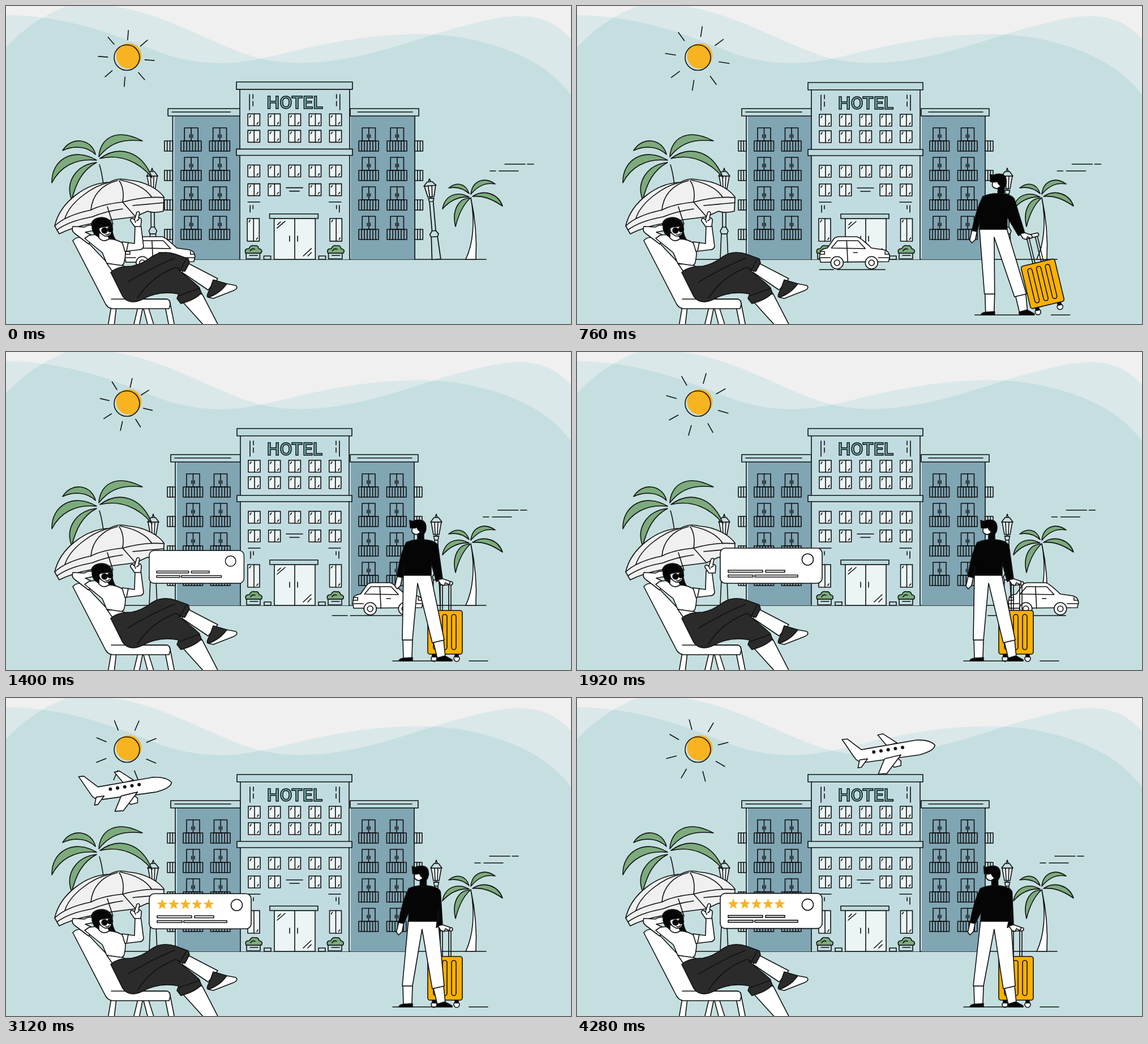
Animation of 998 by 561 pixels, one loop 4.32 s. Source, as an HTML page:

```html
<!DOCTYPE html>
<html lang="en">
<head>
<meta charset="utf-8">
<title>Hotel holiday</title>
<style>
html, body { margin: 0; width: 100%; height: 100%; overflow: hidden; background: #c5dfe0; }
svg { display: block; width: 100vw; height: 100vh; }
path, rect, circle { stroke: #111; stroke-width: 1.6; stroke-linejoin: round; stroke-linecap: round; }
.flat, .flat path { stroke: none; }
text { font: 500 32px Roboto, "Open Sans", sans-serif; text-anchor: middle; fill: #72b5b5; stroke: #111; stroke-width: 1.5; }
</style>
</head>
<body>
<svg id="stage" viewBox="0 0 998 561"></svg>
<script>
const SKY = '#c5dfe0', MIST = '#dae8e9', WALL = '#80a5b3', FRONT = '#c1dce0', TRIM = '#bcdadd',
  GLASS = '#ecf5f5', GREEN = '#7cab7c', GOLD = '#f8b320', DARK = '#2b2b2b', INK = '#050505', CLOTH = '#f0f0f1';
const LOOP = 4320;

const path = (d, fill = 'none', more = '') => `<path d="${d}" fill="${fill}" ${more}/>`;
const rect = (x, y, w, h, fill = 'none', more = '') =>
  `<rect x="${x}" y="${y}" width="${w}" height="${h}" fill="${fill}" ${more}/>`;
const disc = (x, y, r, fill = 'none', more = '') => `<circle cx="${x}" cy="${y}" r="${r}" fill="${fill}" ${more}/>`;
const group = (id, body) => `<g id="${id}">${body}</g>`;
const each = (list, draw) => list.map(draw).join('');
const range = n => [...Array(n).keys()];
const FLAT = 'class="flat"';

// Sky
const waveA = 'M0 73Q45 24 107 0H185C285 12 372 74 455 94C590 122 730 52 810 35C900 9 955 10 998 58V561H0Z';
const waveB = 'M0 16C130 18 215 62 290 88C400 119 465 86 560 68C690 42 790 44 870 72C932 93 968 118 998 157V561H0Z';
const sky = rect(0, 0, 998, 561, CLOTH, FLAT) +
  `<clipPath id="over"><path d="${waveA}"/></clipPath>` +
  path(waveA, MIST, FLAT) + path(waveB, MIST, FLAT) + path(waveB, SKY, FLAT + ' clip-path="url(#over)"');
const sun = disc(217, 88, 22.5, GOLD, FLAT) + disc(213.5, 91, 22.5) + '<path id="rays" fill="none"/>';
const breeze = path('M881 279H917M921 279H932M855 291H865M871 291H905');

// Hotel
const win = (x, y, h = 21) => rect(x - 1, y + 2, 21, h - 1, GLASS, FLAT) + rect(x, y, 21, h) +
  path(`M${x + 11} ${y}v${h}M${x + 3} ${y + 6}l2 -3M${x + 16} ${y + h - 3}l2 -3`);
const rails = (x, y, w, n) => rect(x, y, w, 18) +
  path(each(range(n), i => `M${x + w * (i + 1) / (n + 1)} ${y}v18`));
const balcony = (x, y) => rect(x + 6, y, 23, 23) +
  path(`M${x + 17.5} ${y}v23M${x + 15} ${y + 12}v5M${x + 20} ${y + 12}v5`) + rails(x, y + 23, 34.5, 6);
const floors = [215, 267, 319, 371];
const wing = (fillX, x, roofX, roofW, lineX, cols, sideX) =>
  rect(fillX, 194, 112, 253, WALL, FLAT) + path(`M${x} 194V447`) +
  rect(roofX, 181, roofW, 13, TRIM) + path(`M${lineX} 187h${roofW - 24}`) +
  each(floors, y => each(cols, c => balcony(c, y)) + rails(sideX, y + 23, 14, 2));
const bush = x => rect(x + 1, 436, 24, 10, FRONT) + path(`M${x + 7} 440h14`) +
  path(`M${x} 436Q${x - 3} 428 ${x + 6} 428Q${x + 9} 421 ${x + 16} 423Q${x + 22} 422 ${x + 23} 428Q${x + 31} 430 ${x + 27} 436Z`, GREEN) +
  path(`M${x + 8} 432q3 -5 8 -3`);
const cols = range(5).map(i => 428 + 35.7 * i);
const front = rect(414, 147, 192, 300, FRONT, FLAT) + path('M414 147V447M606 147V447') +
  rect(408, 135, 203, 13, TRIM) + rect(408, 253, 203, 11, TRIM) +
  '<text x="510" y="181.5">HOTEL</text>' +
  path('M431 157V184M437 157V164M437 169V177M589 157V184M583 157V164M583 169V177') +
  each([191, 220, 281], y => each(cols, x => win(x, y))) +
  each(cols, (x, i) => i == 2 ? '' : win(x, 314)) +
  path('M495 321H524M501 327H518M428 346H449M570 346H591M432 352V364M437 352V358M588 352V364M583 352V358') +
  win(427, 375, 40) + win(571.5, 375, 40) +
  rect(474, 375, 72, 72, GLASS) + path('M510 375V447M501 406V415M515 406V415M479 392L493 380M480 386L485 381M525 441L539 428M533 441L539 435') +
  rect(466, 367, 85, 8, TRIM) + rect(456, 441, 12, 6, FRONT) + rect(552, 441, 12, 6, FRONT) +
  bush(424) + bush(568);
const hotel = group('left', wing(302, 299, 291, 123, 298, [313, 361.5], 285)) +
  group('right', wing(609, 721, 608, 120, 621, [623, 672.5], 721)) + group('front', front);

// Street
const lamp = x => `<g transform="translate(${x} 0)">` +
  path('M-7 447L-5 402H5L7 447Z', SKY) + path('M-5 402L-7 397L-3 390H3L7 397L5 402Z', SKY) +
  path('M-3 390V331M3 390V331') + disc(0, 328, 4, SKY) +
  path('M-9 300H9L5 322H-5Z', GLASS) + path('M-10 300L-4 292H4L10 300ZM-2 292L0 286L2 292M-3 300L-2 322M3 300L2 322M-5 325H5', SKY) + '</g>';
const palmLeft = path('M165 280Q170 295 174 330') + each([
  'M164 266C166 233 195 214 241 238C205 234 183 242 164 266Z',
  'M166 269C200 244 240 256 258 303C236 276 203 260 166 269Z',
  'M158 262C152 235 116 228 100 255C120 245 144 248 158 262Z',
  'M160 272C120 248 80 270 81 312C94 286 120 268 160 272Z',
  'M160 276C124 280 104 310 116 342C124 312 134 290 160 276Z'], d => path(d, GREEN));
const palmRight = path('M821 338C829 380 825 420 812 447H830C832 410 828 370 821 338Z', '#fff') + each([
  'M821 332C824 307 846 301 864 314C846 311 833 318 821 332Z',
  'M824 336C845 322 870 332 877 353C858 340 842 334 824 336Z',
  'M818 331C812 312 795 310 782 321C797 318 808 322 818 331Z',
  'M818 337C795 325 775 335 771 358C784 343 800 336 818 337Z',
  'M820 339C800 338 787 360 794 389C800 365 808 350 820 339Z'], d => path(d, GREEN));
const wheel = x => disc(x, 453, 11, '#fff') + disc(x, 453, 5);
const car = '<path id="dash" fill="none"/>' +
  path('M430 452L428 443L430 432Q434 428 442 427L454 410Q457 407 464 407H494Q500 408 520 427L541 430Q552 432 552 443L550 451Z', '#fff') +
  path('M449 427L460 414H496L509 428ZM428 444H447M532 444H551M430 433H437V438H429M544 433V438H551M488 435H495M476 414L478 452') +
  wheel(459) + wheel(520);

// Holidaymaker under the umbrella
const umbrella =
  path('M86 388C96 345 142 312 183 311Q198 302 216 307C246 309 270 324 279 337L278 362Q262 366 250 362L228 372L188 377L150 384Q118 390 94 402Z', CLOTH) +
  path('M86 388Q106 369 150 360Q168 350 206 346Q246 335 279 338M90 395Q112 379 152 372Q176 362 206 358M197 308C168 315 152 335 150 360M200 308C208 320 208 334 206 346M202 307C236 314 250 326 257 337M183 311C150 318 112 348 104 375M206 346L228 371M224 352L279 347') +
  path('M179 354L189 385', 'none', 'stroke-width="3"');
const chair = each([
  'M186 530L180 565H191L195 530Z', 'M279 520L288 565H298L289 520Z',
  'M237 515L225 565H235L245 515Z', 'M238 515L251 565H262L246 515Z',
  'M118 414Q124 406 137 409L195 470L224 517H284Q290 518 290 527L288 534H188Q180 533 176 526Z'], d => path(d, '#fff')) +
  path('M186 517H284');
const woman = chair +
  path('M151 392Q148 375 168 373Q184 373 188 388Q186 400 193 412Q186 420 176 416Q160 414 156 402Z', INK) +
  path('M152 387Q144 386 139 390L118 389Q115 396 121 401L146 420L155 406L140 399L155 396Z', '#fff') +
  path('M146 405Q162 400 176 411Q196 410 208 420Q214 434 208 455L204 458Q190 456 178 454L170 435L139 410Z', '#fff') +
  path('M164 400V409Q172 418 182 411L180 404Z', '#fff') +
  path('M164 393Q172 384 185 387L187 397Q185 408 175 406Q165 402 164 393Z', '#fff') +
  path('M164 402Q160 395 165 391Q176 388 186 389Q182 375 168 374Q152 376 152 392Q154 402 164 408Z', INK) +
  disc(174, 396, 5, INK) + disc(184, 394, 4.5, INK) + path('M176 403Q180 405 183 401') +
  path('M205 416L227 419L228 386L238 385L243 424Q242 430 235 430L210 433Z', '#fff') + path('M216 417L213 432') +
  group('hand', path('M227 389L220 379Q219 374 224 375L227 377L231 364Q234 361 236 365L234 374Q240 373 239 380L238 389Z', '#fff') + path('M227 377L229 382M231 379L235 376')) +
  path('M178 454L206 458L222 464L192 474Z', '#fff') +
  path('M322 454L374 481L357 501L311 470Z', '#fff') +
  path('M366 483L390 490L381 503L358 514Q352 514 360 500Z', DARK) +
  path('M390 490L406 493Q411 498 402 502L366 516L358 514Q378 507 390 490Z', '#fff') +
  path('M312 522L346 507L376 565H351Z', '#fff') +
  path('M185 470Q196 459 222 459Q240 456 258 442Q276 430 300 438L322 446L324 453L316 468L305 466L331 487L341 496L345 506Q335 518 309 525L302 516L305 508Q270 501 240 518Q217 528 206 512Z', DARK) +
  path('M308 465L300 461Q255 478 232 516M298 445Q260 460 215 487M306 511L342 498M318 447L309 464');

// Traveller: the waist sways while hands and feet stay put
const suitcase = path('M767 456V411M771 456V411M782 456V411M786 456V411') + rect(765, 405, 24, 6, '#fff', 'rx="3"') +
  disc(756, 541, 5, '#fff') + disc(796, 541, 5, '#fff') + rect(753, 533, 6, 5, INK) + rect(793, 533, 6, 5, INK) +
  rect(745, 456, 61, 77, '#fbb000', 'rx="4"') + each([755, 771, 787], x => rect(x, 463, 8, 62, 'none', 'rx="4"'));
const head = path('M718 304L717 317Q721 324 730 321L735 306Z', '#fff') +
  path('M714 310L713 297Q719 300 723 297Q741 293 742 309Q742 317 738 321V333H727V321L734 318Q727 315 726 309Q722 312 714 310Z', INK);
const feet = path('M701 508L702 540H717L718 508Z', '#fff') + path('M755 512L762 541L776 538L773 508Z', '#fff') +
  path('M718 545V539L703 540Q694 541 694 545ZM762 545L761 540L775 536L788 543V545Z', INK) +
  path('M683 545H788M818 545H851');
const man = group('bag', suitcase) + feet + path('', '#fff', 'id="pants"') + group('head', head) +
  path('', '#fff', 'id="leftHand"') + path('', INK, 'id="top"') +
  path('M763 402L771 400L783 404Q786 408 782 410L776 407L774 412L768 410Z', '#fff');

const plane = each([
  'M336 125L320 106L329 104L354 120Z',
  'M344 151L356 148L361 152V160L349 163L345 159Z',
  'M257 114L266 113L291 132L388 115Q412 114 421 124Q420 134 394 141L300 154Q284 155 279 146Z',
  'M288 150L285 164L291 163L302 148Z',
  'M332 148L321 175L336 174L361 141Z'], d => path(d, '#fff')) +
  each(range(5), i => disc(313 + 12.7 * i, 136 - 2 * i, 2.2, INK));

// Review card
const star = 'M' + range(10).map(i => {
  const r = i % 2 ? 4.2 : 10, a = i * Math.PI / 5;
  return (r * Math.sin(a)).toFixed(2) + ' ' + (-r * Math.cos(a)).toFixed(2);
}).join('L') + 'Z';
const card = rect(253, 346, 180, 62, '#fff', 'rx="9"') + disc(407.5, 366, 10) +
  rect(267, 385, 61, 3.5) + rect(333, 385, 34, 3.5) + rect(267, 393.5, 44, 3.5) + rect(314, 393.5, 76, 3.5) +
  each(range(5), i => path(star, GOLD, `${FLAT} id="star${i}"`));

const stage = document.getElementById('stage');
stage.innerHTML = sky + sun + group('breeze', breeze) + path('M150 447H848') +
  group('lampLeft', lamp(260)) + group('lampRight', lamp(760)) + palmLeft + palmRight + hotel +
  group('car', car) + group('man', man) + group('plane', plane) + umbrella + woman + group('card', card);

const $ = id => document.getElementById(id);
const set = (id, value) => $(id).setAttribute('transform', value);
const draw = (id, d) => $(id).setAttribute('d', d);
const ramp = (t, a, b) => Math.min(1, Math.max(0, (t - a) / (b - a)));
const smooth = (t, a, b) => { const u = ramp(t, a, b); return u * u * (3 - 2 * u); };
const about = (x, y, change) => `translate(${x} ${y}) ${change} translate(${-x} ${-y})`;

function drawRays(t) {
  const pulse = (1 - Math.cos((t - 200) / 1200 * 2 * Math.PI)) / 2;
  const inner = 31 + 8 * pulse, outer = 47 + 10 * pulse;
  draw('rays', each(range(8), i => {
    const a = (4.2 + .0061 * t + 45 * i) * Math.PI / 180, x = Math.sin(a), y = -Math.cos(a);
    return `M${212.5 + inner * x} ${92.5 + inner * y}L${212.5 + outer * x} ${92.5 + outer * y}`;
  }));
}

function drawMan(t) {
  const tilt = 1 - smooth(t, 740, 1080);
  const s = -11 * tilt + 11 * smooth(t, 2300, 3450), back = s < 0;
  const u = s * (back ? .9 : .5), arm = s * (back ? 1.2 : .3);
  const hem = 750 + s * (back ? 1 : 1.5);
  set('man', `translate(${340 * (1 - ramp(t, 430, 970)) ** 3} 0)`);
  $('man').style.display = t < 430 ? 'none' : '';
  set('bag', `translate(${7 * tilt} ${-2 * tilt}) rotate(${-13.6 * tilt} 775 407)`);
  set('head', `translate(${s * (back ? .3 : .5)} 0)`);
  draw('pants', `M${702 + s} 392H${hem}L774 508L753 513L${727 + .9 * s} 408L718 508H700Z`);
  draw('leftHand', `M${691 + arm} 396L${687 + arm} 413L${691 + arm} 418L${697 + arm} 412L${700 + arm} 397Z`);
  draw('top', `M${707 + u} 336Q${716 + u} 332 ${726 + u} 331H${739 + u}Q${760 + u} 333 ${763 + u} 342` +
    `L771 400L760 405L${hem + 1} 372V394H${702 + s}L${703 + s} 377L${700 + arm} 398L${691 + arm} 396Q${695 + u} 360 ${707 + u} 336Z`);
}

function render(t) {
  const settle = (1 - ramp(t, 0, 320)) ** 2;
  drawRays(t);
  set('breeze', `translate(${-.00865 * t} 0)`);
  set('left', about(414, 447, `scale(${1 + .04 * settle} 1)`));
  set('right', about(606, 447, `scale(${1 + .01 * settle} 1)`));
  set('front', about(510, 447, `scale(${1 + .01 * settle} ${1 + .003 * settle})`));
  set('lampLeft', `rotate(${-.7 * settle} 260 447)`);
  set('lampRight', about(758, 447, `rotate(${-5 * settle}) scale(${1 + .1 * settle} ${1 - .115 * settle})`));

  const lag = 36 * smooth(t, 760, 1400);
  set('car', `translate(${.2875 * (t - 760)} 0)`);
  draw('dash', `M${428 - lag} 465H${453 - .95 * lag}M${460 - lag} 465H${544 - .4 * lag}`);
  drawMan(t);
  set('plane', `translate(${.293 * (t - 3560)} ${-.0566 * (t - 3560)})`);

  const tap = smooth(t, 1680, 1860) - smooth(t, 1980, 2200);
  set('hand', `translate(${6 * tap} ${tap})`);
  const grow = 1 - (1 - ramp(t, 1060, 1640)) ** 3;
  set('card', `translate(0 ${-.0006 * Math.max(0, t - 1920)}) ` + about(253, 408, `scale(${grow})`));
  $('card').style.display = grow ? '' : 'none';
  range(5).forEach(i => set('star' + i,
    `translate(${276 + 20.5 * i} 365) scale(${smooth(t, 1960 + 90 * i, 2140 + 90 * i)})`));
}

const start = performance.now();
function tick() {
  render((performance.now() - start) % LOOP);
  requestAnimationFrame(tick);
}
tick();
</script>
</body>
</html>
```
